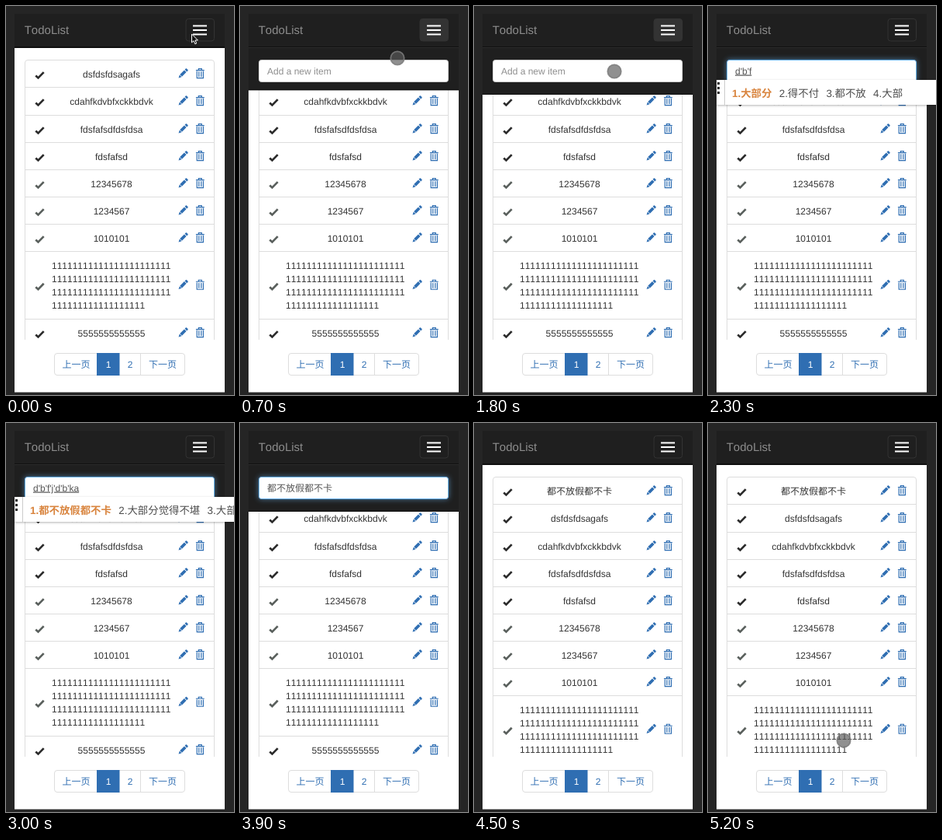
Write an HTML page that moves like this. It is 294 px wide and 500 px high and loops after 5.3 s.

```html
<!DOCTYPE html>
<html lang="zh-CN">
<head>
<meta charset="utf-8">
<title>TodoList</title>
<style>
  html, body { margin: 0; width: 100%; height: 100%; overflow: hidden; background: #252525; }
  svg { display: block; width: 294px; height: 500px; }
  text {
    font: 12px "Liberation Sans", "Noto Sans CJK SC", "Noto Sans CJK", sans-serif;
    font-kerning: none; text-rendering: geometricPrecision; fill: #333;
  }
  .mid { text-anchor: middle; }
  .line { stroke: #ddd; fill: none; }
  .link { fill: #2f6eb2; }
  .icon { fill: #2f6eb2; }
  .icon .wire { fill: none; stroke: #2f6eb2; stroke-width: 1.2; }
  .check { fill: none; stroke: #2b2b2b; stroke-width: 2.7; }
  .done { stroke: #5a605d; }
  .brand { font-size: 15px; fill: #8c8c8c; }
  #ime text { font-size: 13.4px; fill: #4c4c4c; }
  #ime text:first-child { fill: #d9853f; font-weight: bold; }
</style>
</head>
<body>
<svg viewBox="0 0 294 500">
  <defs>
    <g id="pencil" class="icon" transform="rotate(-45)">
      <path d="M-8.3 0L-4.6-1.9V1.9ZM-4-1.9H4V1.9H-4ZM4.9-1.9H6.6Q7.6-1.9 7.6-1V1Q7.6 1.9 6.6 1.9H4.9Z"/>
    </g>
    <g id="trash" class="icon">
      <path class="wire" d="M-5.4-4H5.4M-2-4.2V-6H2V-4.2M-4.1-2.8V6H4.1V-2.8M-1.5-2.3V4.6M1.5-2.3V4.6"/>
    </g>
    <path id="tick" d="M-5.2 .6L-2 3.6L5.2-3.8"/>
    <clipPath id="listClip"><rect x="20" y="60" width="252" height="369"/></clipPath>
    <clipPath id="navClip"><rect id="navHole" x="11" y="10" width="271" height="44"/></clipPath>
    <filter id="glow" x="-10%" y="-60%" width="120%" height="220%"><feGaussianBlur stdDeviation="3.5"/></filter>
    <filter id="drop" x="-5%" y="-20%" width="110%" height="150%"><feDropShadow dx="0" dy="1" stdDeviation="1.5" flood-opacity=".3"/></filter>
  </defs>

  <rect width="294" height="500" fill="#252525"/>
  <rect x="11" y="10" width="271" height="486.5" fill="#fff"/>
  <g id="list" clip-path="url(#listClip)"></g>

  <g id="pager">
    <rect class="line" x="62.5" y="446.5" width="168" height="28" rx="3.5"/>
    <path class="line" d="M173.5 446.5V474.5"/>
    <rect x="117" y="446" width="29.5" height="29" fill="#2f6eb2"/>
    <text class="mid link" x="90.5" y="465">上一页</text>
    <text class="mid" x="132" y="465" style="fill:#fff">1</text>
    <text class="mid link" x="160" y="465">2</text>
    <text class="mid link" x="202" y="465">下一页</text>
  </g>

  <g clip-path="url(#navClip)">
    <rect x="11" y="10" width="271" height="104" fill="#1f1f1f"/>
    <path d="M11 52.5H282" stroke="#101010"/>
    <path d="M11 53.5H282" stroke="#2c2c2c"/>
    <rect id="halo" x="24" y="69" width="245" height="29" rx="4" fill="#66afe9" opacity=".6" filter="url(#glow)"/>
    <rect id="field" x="24.5" y="69.5" width="244" height="28" rx="3" fill="#fff"/>
    <text id="value" x="35" y="87.5"></text>
    <text class="brand" x="23.7" y="36">TodoList</text>
    <rect id="toggle" x="232" y="16.5" width="36.5" height="28.5" rx="3.5" stroke="#333"/>
    <path d="M241 25.5H259M241 31H259M241 36.5H259" stroke="#fff" stroke-width="2"/>
  </g>
  <path id="navEdge" d="M11 0H282" stroke="#0c0c0c"/>

  <g id="imeBox">
    <rect x="11" y="95" width="290" height="32" fill="#fff" filter="url(#drop)"/>
    <path d="M13.5 98V101M13.5 104V107M13.5 110V113" stroke="#222" stroke-width="3"/>
    <path d="M21.5 95V127" stroke="#ccc"/>
    <g id="ime"></g>
  </g>

  <circle id="touch" r="8.7" fill="rgba(90,90,90,.67)" stroke="rgba(125,125,125,.85)" stroke-width="1.8"/>
  <path id="arrow" d="M239.5 36V47L242 44.7L243.8 48.8L245.7 48L243.9 44H247.4Z" fill="#111" stroke="#fff"/>
</svg>

<script>
const LOOP = 5300, STEP = 100;
const $ = id => document.getElementById(id);
const show = (id, on) => $(id).setAttribute('display', on ? 'inline' : 'none');
const set = (id, attrs) => { for (const k in attrs) $(id).setAttribute(k, attrs[k]); };

const ENTRY = '都不放假都不卡';
const ones = n => '1'.repeat(n);
const ITEMS = [
  ['dsfdsfdsagafs'], ['cdahfkdvbfxckkbdvk'], ['fdsfafsdfdsfdsa'], ['fdsfafsd'],
  ['12345678', 1], ['1234567', 1], ['1010101', 1],
  [[23, 23, 23, 18].map(ones), 1], ['5555555555555']
];

function row([label, done], top) {
  const many = Array.isArray(label), h = many ? 86.5 : 35.15, y = Math.round(top);
  const mid = y + h / 2;
  const text = many
    ? label.map((s, i) => `<text x="59" y="${y + 22 + i * 17}">${s}</text>`).join('')
    : `<text class="mid" x="136" y="${y + 22}">${label}</text>`;
  const svg = `${text}
    <use href="#tick" class="check ${done ? 'done' : ''}" x="43.5" y="${mid + 1.3}"/>
    <use href="#pencil" x="228.4" y="${mid - 1}"/><use href="#trash" x="250.3" y="${mid - 1}"/>
    <path class="line" d="M24 ${Math.round(top + h) - .5}H268"/>`;
  return { svg, h };
}

function buildList(items) {
  let top = 70.2, out = '<rect class="line" x="24.5" y="69.5" width="244" height="420" rx="3.5"/>';
  for (const item of items) {
    const r = row(item, top);
    out += r.svg;
    top += r.h;
  }
  return out;
}
const before = buildList(ITEMS), after = buildList([[ENTRY], ...ITEMS]);

// Pinyin buffer and its candidates, one entry per key press
const TYPING = [
  ['d', '的 大 到 都 对 多 等'],
  ["d'b", '大部 得不 代表 对比 担保'],
  ["d'b'f", '大部分 得不付 都不放 大部'],
  ["d'b'f'j", '大部分就 都不放假 大部分'],
  ["d'b'f'j'd", '大部分觉得 都不放假的 大部分'],
  ["d'b'f'j'd'b", '大部分觉得不 都不放假都不 大部分'],
  ["d'b'f'j'd'b'k", '大部分觉得不堪 都不放假都不看 大部分'],
  ["d'b'f'j'd'b'ka", ENTRY + ' 大部分觉得不堪 大部分']
];
const TYPE_FROM = 2100, COMMIT = 3200, OPEN = 480, CLOSE = 4000, ADDED = 4100;

function candidates(words) {
  let x = 31;
  return words.split(' ').map((w, i) => {
    const s = `<text x="${x}" y="116.5">${i + 1}.${w}</text>`;
    x += w.length * 13.4 + 20.5;
    return s;
  }).join('');
}

// CSS "ease" curve, solved by bisection
function ease(p) {
  if (p <= 0) return 0;
  if (p >= 1) return 1;
  const bez = (a, b, u) => 3 * a * u * (1 - u) ** 2 + 3 * b * u * u * (1 - u) + u ** 3;
  let lo = 0, hi = 1;
  for (let i = 0; i < 20; i++) {
    const m = (lo + hi) / 2;
    if (bez(.25, .25, m) < p) lo = m; else hi = m;
  }
  return bez(.1, 1, lo);
}

// Pointer stops: time, x, y
const PATHS = [
  [[200, 243, 37], [400, 245, 34], [500, 238, 42], [700, 203, 67], [1000, 190, 77], [1300, 183, 82], [1600, 181, 84], [2000, 181, 84]],
  [[4800, 190, 330], [5000, 181, 380], [5200, 175, 408]]
];
function pointer(t) {
  const path = PATHS.find(p => t >= p[0][0] && t <= p[p.length - 1][0]);
  if (!path) return null;
  const i = Math.max(1, path.findIndex(p => p[0] >= t));
  const [a, b] = [path[i - 1], path[i]], k = (t - a[0]) / (b[0] - a[0]);
  return { cx: a[1] + (b[1] - a[1]) * k, cy: a[2] + (b[2] - a[2]) * k };
}

function render(t) {
  $('list').innerHTML = t >= ADDED ? after : before;

  const nav = 44 + 60 * (ease((t - OPEN) / 350) - ease((t - CLOSE) / 350));
  set('navHole', { height: nav });
  set('navEdge', { transform: `translate(0 ${10 + nav - .5})` });

  const focus = t >= 1900 && t < CLOSE + 400;
  show('halo', focus);
  set('field', { stroke: focus ? '#66afe9' : '#ccc' });
  set('toggle', { fill: t >= 400 && t < 1900 ? '#333' : '#1f1f1f' });

  const typing = t >= TYPE_FROM && t < COMMIT;
  const key = TYPING[Math.min(TYPING.length - 1, Math.floor((t - TYPE_FROM) / STEP))];
  const value = $('value');
  value.textContent = typing ? key[0] : t >= COMMIT ? ENTRY : 'Add a new item';
  value.style.fill = t < TYPE_FROM ? '#8e8e8e' : '#555';
  value.style.textDecoration = typing ? 'underline' : 'none';
  show('imeBox', typing);
  if (typing) $('ime').innerHTML = candidates(key[1]);

  const p = pointer(t);
  show('touch', p);
  if (p) set('touch', p);
  show('arrow', t < 200);
}

let last = -1;
function tick() {
  const t = Math.floor(performance.now() % LOOP / STEP) * STEP;
  if (t !== last) render(last = t);
  requestAnimationFrame(tick);
}
tick();
</script>
</body>
</html>
```
